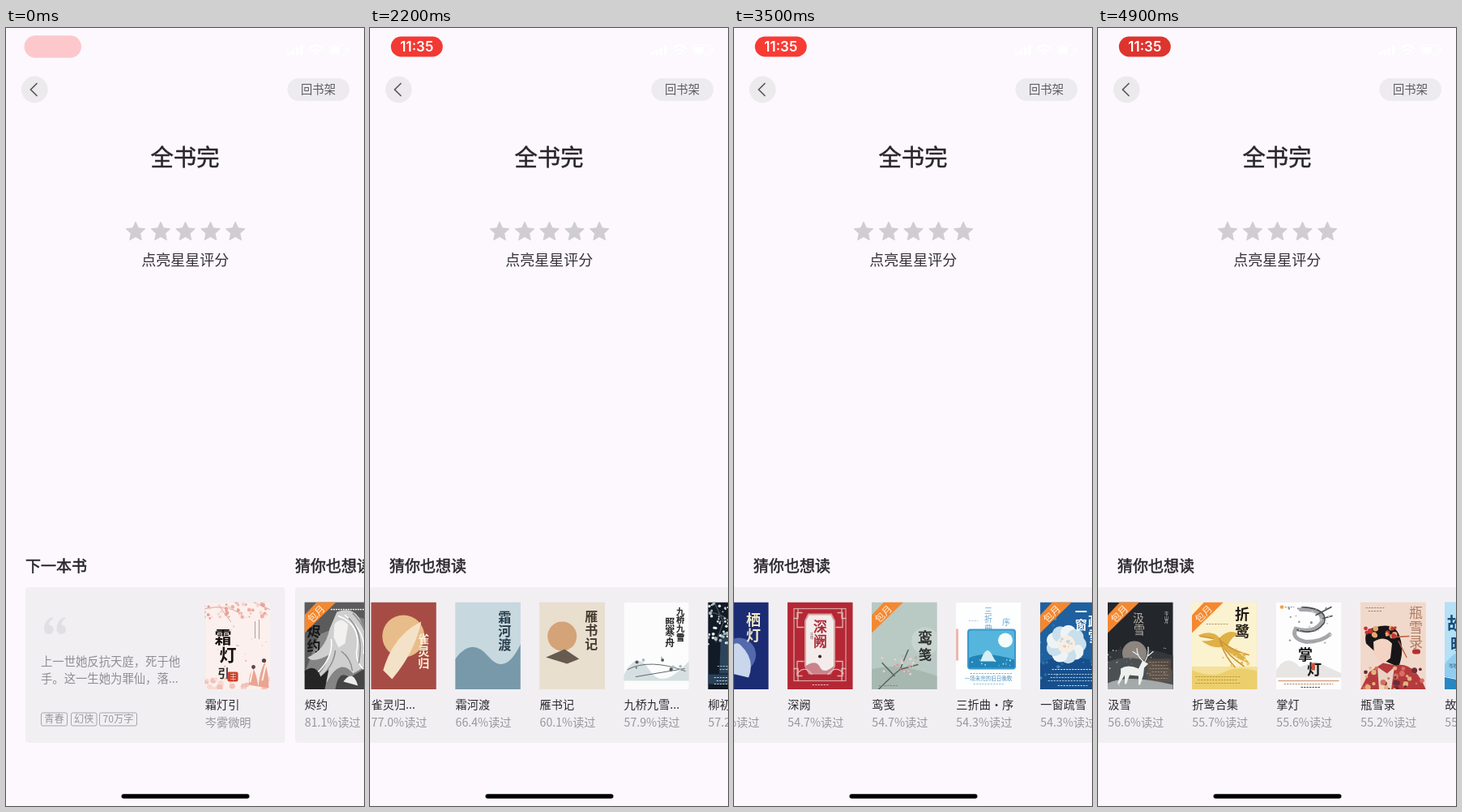
An HTML page for the animation above (5 s loop, 442 by 960 pixels).

```html
<!DOCTYPE html>
<html lang="zh-CN">
<head>
<meta charset="utf-8">
<style>
html, body { margin: 0; width: 100%; height: 100%; overflow: hidden; background: #fcf8fd; }
#stage { display: block; width: 442px; height: 960px; font-family: "Noto Sans CJK SC", "Noto Sans CJK", sans-serif; }
</style>
</head>
<body>
<svg id="stage" viewBox="0 0 442 960"></svg>
<script>
let seed = 7;
const rnd = () => (seed = (seed * 16807) % 2147483647) / 2147483647;

// Shape helpers, each returning SVG markup
const rect = (x, y, w, h, fill, more = '') => `<rect x="${x}" y="${y}" width="${w}" height="${h}" fill="${fill}" ${more}/>`;
const disc = (x, y, r, fill, more = '') => `<circle cx="${x}" cy="${y}" r="${r}" fill="${fill}" ${more}/>`;
const path = (d, fill, more = '') => `<path d="${d}" fill="${fill}" ${more}/>`;
const line = (d, color, w = 1, more = '') => path(d, 'none', `stroke="${color}" stroke-width="${w}" stroke-linecap="round" ${more}`);
const text = (x, y, size, str, fill, more = '') => `<text x="${x}" y="${y}" font-size="${size}" fill="${fill}" ${more}>${str}</text>`;
const column = (x, y, size, str, fill, more = '', dx = 0) =>
  [...str].map((c, i) => text(x + i * dx, y + i * size * 1.08, size, c, fill, more)).join('');
const dots = (n, x, y, w, h, r, ...fills) => Array.from({ length: n }, (_, i) =>
  disc((x + rnd() * w).toFixed(1), (y + rnd() * h).toFixed(1), (r * (.4 + rnd() * .6)).toFixed(1), fills[i % fills.length])).join('');
const rows = (x, y, w, n, color, gap = 4) => Array.from({ length: n }, (_, i) =>
  line(`M${x + i % 2 * 3} ${y + i * gap}h${w - i % 2 * 6}`, color, .9, 'stroke-dasharray="1.5 2"')).join('');
const bold = 'font-weight="700"', mid = 'text-anchor="middle"';
// Thin outline gives the regular face a medium weight
const medium = 'stroke="#29272b" stroke-width=".55"';

const ribbon = path('M15 0H39L0 38V16Z', '#f5882f') +
  text(0, 0, 12, '包月', '#fff0df', `${mid} transform="translate(17.5 17.5) rotate(-45)"`);

const art = {
  nextUp: () => rect(0, 0, 81, 108, '#fbf0ed') + line('M0 8Q26 2 44 14M18 5L32 24M60 0L80 9', '#c9968e', .8) +
    dots(50, 0, 0, 80, 20, 2.4, '#efb0a6', '#f7d3cc', '#e9a197') + dots(12, 0, 20, 80, 60, 1.2, '#efb6ae') +
    line('M62 24v20M67 22v24', '#b5a29d', 1.2, 'stroke-dasharray="2 1"') +
    dots(24, 0, 94, 80, 14, 4, '#f7dad2', '#f2c2b7') +
    path('M54 102Q55 86 60 82Q64 90 66 104ZM66 104Q68 84 74 74Q79 87 79 106Z', '#e9a592') +
    disc(60, 80, 2.4, '#594442') + disc(73, 72, 2.6, '#594442') + line('M59 84L56 98M75 78L71 96', '#fff2ea', 2) +
    column(12, 50, 21, '霜灯', '#17120f', bold, 6) + text(16, 92, 14, '引', '#17120f', medium) +
    rect(28, 86, 13, 12, '#c9422f', 'rx="2"') + line('M32 89h6M32 92h6M32 95h6M35 88v8', '#f8d2c4', .7),
  bone: () => rect(0, 0, 81, 108, '#858585') + path('M0 0H81V24Q52 8 38 32L18 40 0 88Z', '#5b5b5c') +
    column(3, 42, 17, '烬约', '#161616', bold) +
    path('M40 12Q62 4 70 25Q82 48 81 76L60 88Q44 68 28 98Q20 106 8 96Q26 85 30 65Q10 76 4 68Q26 59 31 33Z', '#cfcfcf') +
    path('M37 27Q45 17 54 28L50 51 42 56 36 43Z', '#f3f1f0') +
    line('M42 17Q69 27 65 57Q61 75 78 87M50 16Q77 37 73 63M33 46Q36 68 15 88', '#fff', 1.5) +
    line('M55 20Q74 38 67 75M60 14Q79 34 79 58M38 60Q36 80 16 96M46 61Q57 69 59 84', '#8b8b8b', 1.5) +
    path('M0 85Q14 75 20 92L30 83 25 108H0Z', '#252525') + path('M38 108Q42 82 56 93L81 78V108Z', '#454546') +
    path('M48 98Q60 82 66 103Z', '#ececec') + line('M33 9H77', '#eee', 1.4, 'stroke-dasharray="1 2"'),
  ring: () => rect(0, 0, 81, 108, '#e6e4e6') + dots(14, 0, 0, 80, 70, 4, '#dfdde0', '#efedef') +
    column(68, 12, 7, '七灯七夜', '#333', medium) + column(59, 28, 9, '长明枝', '#302e2e', bold) +
    line('M14 9v35M20 12v28M26 9v32', '#76757a', 1, 'stroke-dasharray="2 1"') +
    disc(41, 82, 22, '#eeecec', 'stroke="#cbc6c5" stroke-width="3" stroke-dasharray="3 1"') +
    path('M34 54Q42 51 45 64L62 78Q55 88 29 85Q28 68 34 54Z', '#b98580') + path('M34 60L46 67 44 86 35 82Z', '#eedbd3') +
    path('M33 54Q29 43 37 43Q43 45 41 55L34 69Z', '#302a2c') + dots(8, 14, 78, 58, 13, 3, '#c6a59b', '#d9d3d4') +
    rows(20, 103, 42, 1, '#777'),
  bird: () => rect(0, 0, 81, 108, '#a64c45') + disc(40, 42, 26, '#e8bd8a') +
    path('M15 84Q28 40 62 24Q54 62 26 95Z', '#f4e2c8') + column(58, 50, 14, '雀灵归', '#fff1da', bold),
  river: () => rect(0, 0, 81, 108, '#c8d8df') + path('M0 70Q20 42 41 67T81 51V108H0Z', '#7799aa') + column(53, 24, 16, '霜河渡', '#263d4a', bold),
  goose: () => rect(0, 0, 81, 108, '#e8dfcf') + disc(28, 42, 18, '#d4a378') + path('M8 68L31 58 49 70 34 76Z', '#675b50') + column(56, 23, 16, '雁书记', '#493a32', bold),
  bridge: () => rect(0, 0, 81, 108, '#fcfcfc') + column(65, 15, 10, '九桥九雪', '#222', medium) + column(51, 29, 12, '照寒舟', '#222', bold) +
    path('M0 90Q16 58 32 84T81 72V97H0Z', '#d5dfe2') + line('M5 83Q32 69 76 85M15 92L75 82', '#60686b', 1) + dots(9, 8, 66, 65, 24, 2.5, '#a9bdc2', '#555'),
  plum: () => rect(0, 0, 81, 108, '#111a27') + path('M16 38L54 48 60 88H14Z', '#2b4459') + path('M26 68L38 52 47 84H24Z', '#6f8da2') +
    line('M0 13Q22 12 34 35M8 0L19 25L10 49', '#424e55', 1.5) + dots(65, 0, 0, 38, 52, 2.2, '#edf1ef', '#aebbc0') +
    dots(14, 54, 45, 26, 25, 2, '#c8d3d6', '#6e7f8c') + disc(57, 25, 20, '#f1e7d2') +
    text(43, 22, 16, '柳', '#8a5740', medium) + text(60, 29, 13, '初', '#8a5740') + text(52, 42, 16, '三', '#8a5740') +
    path('M34 88V76Q39 64 43 76V91Z', '#182838') + rect(0, 89, 81, 12, '#375a79', 'opacity=".6"') +
    rows(12, 79, 50, 2, '#b9ccd8') + rows(8, 93, 64, 3, '#dce4ea'),
  screen: () => rect(0, 0, 81, 108, '#2d6867') + rect(32, 9, 18, 45, '#d9bd91') + rect(33.5, 10.5, 15, 42, 'none', 'stroke="#9e7650" stroke-width=".7"') +
    column(33, 27, 16, '素屏', '#714927', bold) + line('M17 20v15M61 15v15M66 18v9', '#9bb9a9', 1, 'stroke-dasharray="1.5 1"') +
    path('M4 77Q40 36 76 77Q40 116 4 77Z', '#214f50', 'stroke="#c79d65" stroke-width="1.2"') +
    path('M14 77Q17 62 40 61T66 77Q61 95 40 95T14 77Z', '#f1e3cd', 'stroke="#b78054"') +
    path('M16 84Q35 75 64 84Q58 94 40 94T16 84Z', '#d2cdbb') + path('M25 78Q30 66 36 76L48 73 43 81 31 84Z', '#c65b38') +
    line('M30 82v6M36 81v7M45 71L55 66', '#80543d', 1) + rows(24, 102, 32, 1, '#b7c7b7'),
  peacock: () => rect(0, 0, 81, 108, '#214d96') + disc(21, 11, 13, '#d8bd94') + line('M80 16Q50 20 37 35M81 37Q62 34 51 42M72 20L69 68', '#856f65', 1.4) +
    path('M12 8Q19 2 23 11Q20 28 37 31Q54 37 79 78Q56 59 45 57Q27 54 18 37Q13 24 16 13Z', '#edf0ef') +
    line('M24 29Q57 36 73 69M23 38Q45 45 60 58M17 13L9 16M19 6V0', '#aebdd0', 1) +
    dots(40, 49, 8, 32, 47, 3, '#f2ede3', '#d9d8d4') + dots(14, 56, 92, 25, 14, 3, '#e9e6dc') +
    text(28, 62, 12, '溪宛', '#d8ca8d') + text(28, 76, 12, '柳新', '#d8ca8d') + rows(30, 99, 40, 1, '#bdcce0'),
  deer: () => rect(0, 0, 81, 108, '#23272c') + path('M0 62Q30 50 81 66V108H0Z', '#34383c') + disc(33, 63, 15, '#8c8580') +
    path('M0 74Q30 60 81 84V108H0Z', '#4b5053') +
    column(31, 24, 14, '汲雪', '#b8b1a7', '', 1) + column(70, 15, 5, '岑山月', '#ddd') + rect(49, 70, 29, 28, '#6a5647', 'opacity=".6"') + rows(52, 74, 24, 6, '#a08d7e') +
    path('M0 100Q25 88 81 102V108H0Z', '#a4a9aa') + dots(30, 0, 54, 76, 50, .9, '#ccc', '#899') +
    path('M16 82Q25 76 38 82L43 72 50 76 45 81 44 90 40 102H38L38 91 27 90 23 101H21L21 90 14 101H12L16 88Z', '#eef0ec') +
    line('M44 73Q36 67 36 57M37 65L31 61M46 73Q51 65 50 56M50 66L56 61', '#edf0ee', 1.2),
  heron: () => rect(0, 0, 81, 108, '#fbf2cf') + rect(0, 80, 81, 28, '#eccf6c') + path('M0 80H81V85Q54 78 40 86T0 84Z', '#f4e09a') + rows(5, 92, 55, 3, '#b59235') +
    path('M7 41Q25 33 34 44Q45 32 58 39Q48 43 44 54Q57 58 72 76Q51 69 38 55Q26 58 12 48Q25 48 29 45Z', '#dfb047') +
    line('M34 45Q39 65 53 80M36 48Q50 60 70 65M27 45L10 42M36 50Q42 64 64 79', '#cb9335', 1.6) + dots(16, 38, 55, 32, 24, 2.2, '#dfae3e', '#f0cf70') +
    text(53, 21, 18, '折', '#211b13', bold) + text(53, 42, 18, '鹭', '#211b13', bold) + rows(18, 27, 27, 1, '#a98f5b'),
  lamp: () => rect(0, 0, 81, 108, '#fdfdfd') + disc(7, 6, 2.3, '#f3a140') + rows(11, 6, 11, 1, '#888') +
    line('M30 9Q60 8 56 25Q47 39 24 33Q18 45 37 49Q56 49 66 40', '#a5a6a9', 5) + line('M32 6Q65 8 59 26Q47 42 26 34M49 16L68 6M58 20L69 17', '#4a4c50', 1.6) +
    dots(24, 15, 6, 55, 46, 1.6, '#c9c9ca', '#8d8f93') + path('M0 84Q13 62 29 80L49 73 81 88V93H0Z', '#e8e6e4') +
    text(27, 71, 18, '掌', '#181818', bold) + text(38, 89, 18, '灯', '#181818', bold) + rect(44, 75, 4, 9, '#ca5840') +
    line('M3 97H77', '#d9a284', 1.4) + rows(10, 101, 60, 1, '#aa7b65') + rows(31, 105, 23, 1, '#333'),
  vase: () => rect(0, 0, 81, 108, '#f0d9cb') + path('M7 51Q3 34 18 31Q42 24 48 41Q55 60 47 80L31 73Z', '#171517') +
    path('M16 49Q30 40 39 51L37 69 27 77 17 67Z', '#f3d3c3') + path('M0 108L11 86 28 75 43 78Q66 72 81 108Z', '#b53a3e') +
    path('M21 80L33 88 42 80 38 108H23Z', '#e8d3c4') + dots(18, 3, 31, 42, 13, 3.6, '#c63336', '#e2aa72') + dots(34, 5, 80, 72, 28, 3.6, '#d66f5e', '#e2b27e', '#6d2c36') +
    line('M47 48L57 68M43 43L60 42', '#ba5b42', 1.3) + column(60, 19, 17, '瓶雪录', '#b07a60') + rect(64, 58, 10, 6, '#b62f31', 'rx="3"') + rows(7, 7, 22, 2, '#8d7868'),
  letter: () => rect(0, 0, 81, 108, '#8fcdf0') + path('M0 0H50Q66 27 30 51T0 82Z', '#b5e0f5') + path('M28 81Q50 52 81 72V100H28Z', '#d3edf6') +
    line('M80 31Q57 39 43 58M64 42L54 26M71 34L77 20', '#655e6c', 1.5) + dots(25, 44, 23, 36, 32, 2.8, '#f4dfe3', '#de918f', '#fff') + line('M72 6L42 91', '#9ebac9', 2.5) + line('M73 6L65 31', '#52677c', 2) +
    text(3, 33, 21, '故', '#174b78', bold) + text(23, 41, 20, '人', '#174b78', bold) + text(7, 59, 20, '晚', '#174b78', bold) + text(20, 74, 23, '笺', '#174b78', bold) +
    text(5, 80, 6, '岑晚', '#355c73') + disc(23, 77, 3, '#cf3c39') + path('M0 91Q40 102 81 91V108H0Z', '#2787c3') + line('M0 92Q40 103 81 92', '#f0fbff', 1) + text(40, 103, 6, '·故人晚笺·', '#fff', mid),
  smoke: () => rect(0, 0, 81, 108, '#d8d3d9') + path('M0 86Q45 62 17 35Q48 53 40 72T81 82V108H0Z', '#a194aa') + column(52, 24, 17, '描烟影', '#4e405c', bold),
  nest: () => rect(0, 0, 81, 108, '#1b2c74') + disc(44, 65, 21, '#526aad') + path('M30 87Q32 44 45 52Q65 70 56 93Z', '#cad6eb') + column(53, 28, 18, '栖灯', '#f2e8c8', bold),
  palace: () => rect(0, 0, 81, 108, '#b52735') + rect(8, 8, 64, 89, 'none', 'stroke="#dba5a1" stroke-width="1.2"') +
    line('M13 8V20H8M67 8V20H72M13 97V82H8M67 97V82H72M18 13H12V31H20M62 13H68V31H60M18 91H12V73H20M62 91H68V73H60', '#e2b1ad', 1.3) +
    path('M26 15H54L58 23V79L53 88H27L22 79V23Z', '#f3eceb', 'stroke="#d8a4a0" stroke-width="2"') +
    column(32, 36, 17, '深阙', '#a72733', medium.replace('#29272b', '#a72733')) + disc(40, 67, 2, '#3a2628') + column(28, 41, 4, '岑微', '#78575a') +
    path('M22 79Q35 70 40 80T58 78L53 88H27Z', '#c9838b') + line('M12 88Q22 77 30 89M50 89Q60 77 69 88', '#eec2bd', 1.2) + rows(31, 102, 20, 1, '#f2d9d7'),
  paper: () => rect(0, 0, 81, 108, '#b9c9c3') + path('M0 83Q30 73 81 91V108H0Z', '#a7b8b1') + disc(66, 48, 17, '#c8d4ce') +
    text(57, 50, 18, '鸾', '#252c2b', medium) + text(58, 70, 16, '笺', '#252c2b', medium) + line('M8 108Q25 91 35 83L45 59M35 83L57 77M28 91L13 75', '#58625e', 1.5) +
    dots(22, 12, 66, 44, 23, 1.8, '#d99c97', '#e9d2cb') + rows(9, 103, 24, 1, '#74837d'),
  song: () => rect(0, 0, 81, 108, '#fdfefe') + rect(0, 33, 3, 39, '#edb4ae') + column(35, 14, 10, '三折曲', '#6ea8cd') + text(57, 28, 10, '序', '#6ea8cd') + rows(16, 23, 11, 1, '#a9c8dd') +
    rect(14, 33, 60, 50, '#3998cc', 'rx="4"') + rect(16, 35, 56, 46, '#56b5dc', 'rx="3"') + disc(61, 47, 9, '#f4fbfb') +
    path('M16 69Q35 59 72 71V81H16Z', '#2384b7') + path('M33 66Q39 53 45 66L49 73H30Z', '#d6eef5') + dots(12, 18, 70, 51, 9, 1.2, '#bce4ef') +
    rows(18, 88, 52, 1, '#6faace') + text(40, 96, 6.5, '一场未完的旧日晚歌', '#4d93c0', mid) + rows(22, 101, 38, 1, '#91b8d0'),
  window: () => rect(0, 0, 81, 108, '#1f609f') + path('M0 75Q26 61 81 75V108H0Z', '#174f8c') + dots(35, 0, 20, 80, 75, 2, '#4a8abd', '#2b70ad') +
    Array.from({ length: 9 }, (_, i) => disc(32 + 15 * Math.cos(i * .7), 52 + 14 * Math.sin(i * .7), 10, i % 2 ? '#eef4f6' : '#c9dfeb')).join('') +
    disc(32, 52, 11, '#f6eee5') + dots(12, 25, 45, 14, 14, 2, '#e7ceb3', '#b7d5e4') +
    column(43, 17, 15, '一窗', '#fff', bold) + column(59, 30, 17, '疏雪', '#fff', bold) +
    rows(15, 83, 52, 1, '#fff') + rows(10, 89, 60, 3, '#b9d4e6') + rows(22, 103, 36, 1, '#dce9f1')
};

// title, readers %, art, has ribbon, time its cover appears
const books = [
  ['烬约', 81.1, 'bone', 1], ['七灯七夜...', 77.2, 'ring'], ['雀灵归...', 77.0, 'bird', 0, 1800],
  ['霜河渡', 66.4, 'river'], ['雁书记', 60.1, 'goose'], ['九桥九雪...', 57.9, 'bridge'],
  ['柳初三（...', 57.2, 'plum'], ['素屏：完...', 57.0, 'screen', 1], ['宛溪新柳...', 56.9, 'peacock'],
  ['汲雪', 56.6, 'deer', 1], ['折鹭合集', 55.7, 'heron', 1], ['掌灯', 55.6, 'lamp'],
  ['瓶雪录', 55.2, 'vase', 0, 3200], ['故人晚笺', 55.1, 'letter'], ['描烟影', 54.7, 'smoke', 0, 3300],
  ['栖灯', 54.7, 'nest', 1, 3300], ['深阙', 54.7, 'palace'], ['鸾笺', 54.7, 'paper', 1],
  ['三折曲·序', 54.3, 'song'], ['一窗疏雪', 54.3, 'window', 1]
];

const book = (x, title, sub, pic, tag, late = 0) =>
  `<svg x="${x}" y="708.5" width="80.5" height="107.5">${rect(0, 0, 81, 108, '#dfdce0')}` +
  `<g class="art" data-late="${late}">${art[pic]()}</g>${tag ? ribbon : ''}</svg>` +
  text(x + .3, 840, 14.2, title, '#2b2a2e') + text(x + .3, 861.5, 14.2, sub, '#98969b');

const label = (x, w, str) => rect(x + .5, 845, w, 16, 'none', 'rx="2" stroke="#a7a5a9"') +
  text(x + .5 + w / 2, 857.3, 12.2, str, '#98969b', mid);

const star = x => {
  const pts = Array.from({ length: 10 }, (_, i) => {
    const r = i % 2 ? 5.9 : 12.4, a = i * Math.PI / 5;
    return `${x + r * Math.sin(a)},${251.6 - r * Math.cos(a)}`;
  });
  return `<polygon points="${pts.join(' ')}" fill="#d0cdd2" stroke="#d0cdd2" stroke-linejoin="round"/>`;
};

const quote = x => path(`M${x + 10} 727Q${x} 730 ${x} 742A5.8 5.8 0 1 0 ${x + 6} 736.5Q${x + 6} 732 ${x + 11} 729Z`, '#e2dfe4');

const stage = document.getElementById('stage');
stage.innerHTML = rect(0, 0, 442, 960, '#fcf8fd') +
  `<g id="pill">${rect(-32, -12.5, 64, 25, 'inherit', 'rx="12.5"')}` +
  text(0, 6, 17, '', '#fff', `id="clock" ${mid} font-weight="600" font-family="Inter, sans-serif"`) + '</g>' +
  [0, 1, 2, 3].map(i => rect(347 + i * 5.3, 29 - i * 2.6, 3.6, 4.5 + i * 2.6, '#fff', 'rx="1"')).join('') +
  line('M375 25Q382 18 390 25M378 28.5Q382 25 387 28.5', '#fff', 2.5) + disc(382.5, 31.5, 1.8, '#fff') +
  rect(399, 21, 22, 12, 'none', 'rx="3.5" stroke="#fff"') + rect(401, 23, 11, 8, '#fff', 'rx="2"') + rect(422.5, 25, 1.5, 4, '#fff') +
  disc(35.3, 76, 16.4, '#edeaee') + line('M38 68.5L30.5 76L38 83.5', '#59575b', 1.7) +
  rect(347.5, 62, 76.5, 28, '#edebef', 'rx="14"') + text(385.5, 81.2, 14.3, '回书架', '#5c5a5e', mid) +
  text(221, 170, 28.3, '全书完', '#29272b', `${mid} ${medium}`) +
  [160, 191, 221.5, 252.5, 283.2].map(star).join('') +
  text(221.3, 292.7, 18, '点亮星星评分', '#343236', mid) +
  text(24, 670.5, 19, '下一本书', '#29272b', `id="next" ${medium}`) +
  text(357, 670.5, 19, '猜你也想读', '#29272b', `id="more" ${medium}`) +
  `<g id="track">${rect(24, 690, 320.5, 192, '#f2eff3', 'rx="4"')}${rect(357, 690, 2079.5, 192, '#f2eff3', 'rx="4"')}` +
  quote(47) + quote(62.5) +
  text(43, 787.3, 14.35, '上一世她反抗天庭，死于他', '#8f8d92') + text(43, 808.3, 14.35, '手。这一生她为罪仙，落...', '#8f8d92') +
  label(43, 32, '青春') + label(80, 31.5, '幻侠') + label(115, 46, '70万字') +
  book(245.5, '霜灯引', '岑雾微明', 'nextUp') +
  books.map(([title, pct, ...rest], i) => book(368.5 + i * 104, title, pct.toFixed(1) + '%读过', ...rest)).join('') + '</g>' +
  rect(142.5, 945.2, 158, 5.5, '#000', 'rx="2.75"');

const $ = id => document.getElementById(id);
const pill = $('pill'), clock = $('clock'), next = $('next'), more = $('more'), track = $('track');
const covers = [...document.querySelectorAll('.art')].filter(a => +a.dataset.late);

// Swipes as [time, offset, speed], joined by cubic curves
const swipes = [[0, 0, 0], [1200, 0, 0], [1700, 174, .75], [2600, 947, 1], [3100, 1546, 1.15],
  [3650, 2018.5, 0], [3800, 2018.5, 0], [3900, 2000.5, -.45], [4900, 1292.5, -.4], [5000, 1260, -.2]];

function offset(t) {
  const i = swipes.findIndex(k => k[0] > t);
  const [t0, a, va] = swipes[i - 1], [t1, b, vb] = swipes[i];
  const d = t1 - t0, u = (t - t0) / d, w = 1 - u;
  return a * w * w * (1 + 2 * u) + va * d * u * w * w + b * u * u * (3 - 2 * u) - vb * d * u * u * w;
}

function draw(now) {
  const t = Math.floor(now % 5000 / 100) * 100;
  const s = offset(t);
  track.setAttribute('transform', `translate(${-s} 0)`);
  next.setAttribute('x', Math.min(24, 268 - s));
  more.setAttribute('x', Math.max(24, 357 - s));
  covers.forEach(c => c.style.display = t < c.dataset.late ? 'none' : '');

  const show = Math.min(1, t / 300);
  const glow = Math.max(0, Math.min(1, .5 + .65 * Math.cos((t - 1780) / 2050 * 2 * Math.PI)));
  pill.setAttribute('transform', `translate(57.8 23) scale(${1.1 - .1 * show})`);
  pill.setAttribute('opacity', .25 + .75 * show);
  pill.setAttribute('fill', t ? `rgb(${222 + 31 * glow},${52 + 8 * glow},${46 + 7 * glow})` : '#ff3b3b');
  clock.textContent = t < 2200 ? '11:34' : '11:35';
  clock.setAttribute('opacity', show);
  requestAnimationFrame(draw);
}
draw(0);
</script>
</body>
</html>
```
